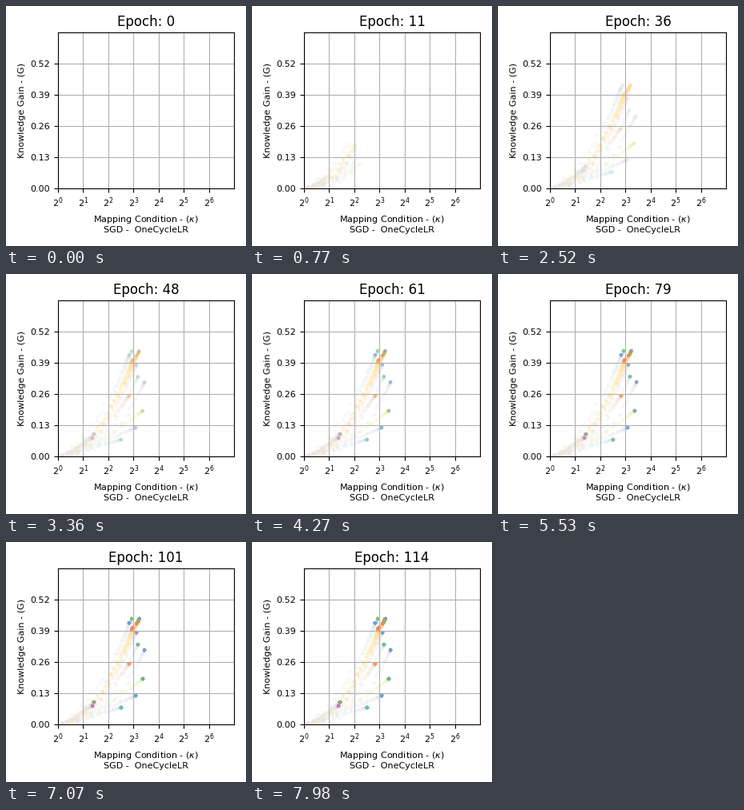
Recreate the animation shown at these times as a matplotlib script. Size 300 by 300 pixels, loop 8 s.

```python
import numpy as np
import matplotlib.pyplot as plt
from matplotlib.animation import FuncAnimation
from matplotlib.colors import to_rgb

EPOCHS = 115
LOOP_MS = 8000
SETTLE = 41          # from here on the dots rest and build up opacity

YELLOW, SKY, LILAC = "#ffdf88", "#cfe3ee", "#dad7ea"
LIME, MINT, PEACH, GREY = "#ecee9c", "#d3ead6", "#fbd3bd", "#dedee2"
BLUE, GREEN, TEAL = "#6f9fd0", "#7cc777", "#62c2a2"
ORANGE, RED, PINK = "#fb9a52", "#f8806a", "#cf74bd"

# log2 of end condition, end gain, curve power, trail colour, dot colour
LAYERS = [
    (2.93, 0.440, 1.80, MINT, GREEN),
    (2.83, 0.423, 1.75, SKY, BLUE),
    (3.23, 0.440, 1.95, YELLOW, BLUE),
    (3.12, 0.420, 2.00, PEACH, RED),
    (3.18, 0.428, 1.95, YELLOW, GREEN),
    (3.21, 0.436, 1.90, YELLOW, ORANGE),
    (2.93, 0.397, 2.00, YELLOW, ORANGE),
    (2.97, 0.403, 1.95, YELLOW, RED),
    (3.12, 0.383, 2.10, LILAC, "#829fd0"),
    (3.18, 0.333, 2.20, MINT, TEAL),
    (3.44, 0.310, 2.50, LILAC, BLUE),
    (2.83, 0.253, 1.60, PEACH, ORANGE),
    (3.37, 0.190, 1.45, LIME, "#4fbd9a"),
    (3.09, 0.120, 1.20, LILAC, BLUE),
    (2.51, 0.070, 1.10, SKY, TEAL),
    (1.43, 0.093, 1.40, GREY, "#93a585"),
    (1.37, 0.077, 1.30, GREY, PINK),
]


def build_points():
    """Positions and colours of all dots, ordered by epoch then by layer."""
    rng = np.random.default_rng(4)
    epochs = np.arange(1, EPOCHS)[:, None]
    log_k, gain, power = (np.array([row[i] for row in LAYERS]) for i in range(3))
    span = 50 + rng.uniform(-2, 3, len(LAYERS))
    rest = (1 - np.minimum(epochs / span, 1)) ** 4.2
    wobble = rng.normal(0, 0.05, (2, *rest.shape)) * rest
    u, v = np.clip(1 - rest + wobble, 0, 1)
    points = np.stack([2 ** (log_k * u), gain * v ** power], axis=-1)

    trail = np.array([(*to_rgb(row[3]), 0.17) for row in LAYERS])
    dot = np.array([(*to_rgb(row[4]), 0.04) for row in LAYERS])
    colors = np.where((epochs < SETTLE)[:, :, None], trail, dot)
    return points.reshape(-1, 2), colors.reshape(-1, 4)


points, colors = build_points()

fig = plt.figure(figsize=(3, 3), dpi=100)
ax = fig.add_axes([65.05 / 300, 0.24, 220 / 300, 0.65])
dots = ax.scatter([], [], s=10, linewidths=0)
ax.set_xscale("log", base=2)
ax.set_xlim(1, 2 ** 7)
ax.set_ylim(0, 0.65)
ax.set_xticks([2 ** i for i in range(7)])
ax.set_xticks([], minor=True)
ax.set_yticks(np.arange(5) * 0.13)
ax.yaxis.set_major_formatter("{x:.2f}")
ax.tick_params(labelsize=8)
ax.grid(True)
ax.set_xlabel("Mapping Condition - ($\\kappa$)\nSGD -  OneCycleLR", fontsize=8)
ax.set_ylabel("Knowledge Gain - (G)", fontsize=8)
title = ax.set_title("Epoch: 0", fontsize=12)


def update(epoch):
    n = epoch * len(LAYERS)
    dots.set_offsets(points[:n])
    dots.set_facecolor(colors[:n])
    title.set_text(f"Epoch: {epoch}")
    return dots, title


def init():
    return update(0)


anim = FuncAnimation(fig, update, frames=EPOCHS, init_func=init,
                     interval=LOOP_MS / EPOCHS, repeat=True, repeat_delay=0)
plt.show()
```
